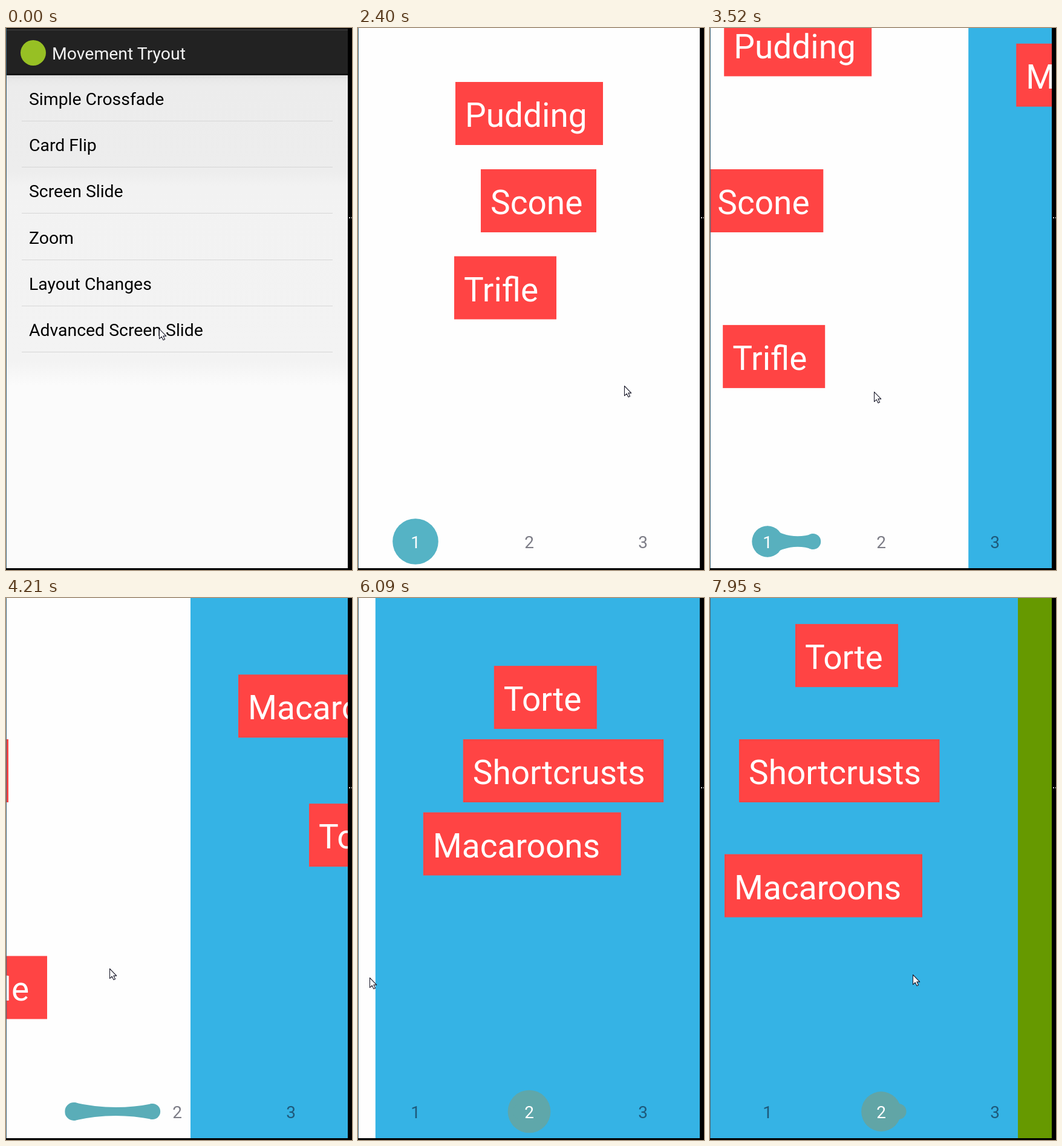
An HTML page for the animation above (8 s loop, 572 by 894 pixels).

```html
<!DOCTYPE html>
<html lang="en">
<head>
<meta charset="utf-8">
<title>Screen slide</title>
<style>
  html, body { margin: 0; width: 100%; height: 100%; overflow: hidden; background: #000; }
  svg { display: block; width: 572px; height: 894px; font-family: Roboto, "Noto Sans", sans-serif; }
  .box rect { fill: #ff4444; }
  .box text { fill: #fff; font-size: 55px; }
  .tab { font-size: 28px; text-anchor: middle; }
  .item { font-size: 28.4px; fill: #000; }
</style>
</head>
<body>
<svg viewBox="0 0 572 894">
  <defs>
    <clipPath id="screen"><rect x="1" y="0" width="564" height="891"/></clipPath>
    <linearGradient id="paper" gradientUnits="userSpaceOnUse" x1="0" y1="78" x2="0" y2="891">
      <stop offset="0" stop-color="#dedede"/>
      <stop offset=".008" stop-color="#e8e8e8"/>
      <stop offset=".022" stop-color="#ececec"/>
      <stop offset=".195" stop-color="#ededed"/>
      <stop offset=".225" stop-color="#f2f2f2"/>
      <stop offset=".58" stop-color="#f3f3f3"/>
      <stop offset=".63" stop-color="#fbfbfb"/>
      <stop offset="1" stop-color="#fbfbfb"/>
    </linearGradient>
  </defs>
  <rect width="572" height="894" fill="#000"/>
  <rect width="1" height="891" fill="#40687d"/>
  <path d="M567 312h2v2h-2zM571 312h1v2h-1z" fill="#ccc"/>
  <g clip-path="url(#screen)">
    <rect width="565" height="891" fill="#fefefe"/>
    <rect id="blue" width="564" height="891" fill="#35b3e5"/>
    <rect id="green" width="564" height="891" fill="#669900"/>
    <g id="boxes"></g>
    <g id="dot"><path/><circle/><circle/></g>
    <g id="tabs"></g>
    <g id="menu">
      <rect y="78" width="565" height="813" fill="url(#paper)"/>
      <rect width="565" height="78" fill="#222"/>
      <rect width="565" height="2" fill="#0c0c0c"/>
      <rect y="2" width="565" height="2" fill="#383838"/>
      <rect y="75" width="565" height="3" fill="#141414"/>
      <circle cx="45" cy="41" r="21" fill="#97c024"/>
      <text x="76" y="52" font-size="28.4" fill="#f3f3f3">Movement Tryout</text>
    </g>
    <path id="cursor" d="M.5 .5V16.6L4.2 13.2L7 18.8L9.6 17.6L6.9 12.1H11.8Z"
          fill="#fff" stroke="#1c1c2c" stroke-width="1.1" stroke-linejoin="round"/>
  </g>
</svg>
<script>
const LOOP = 8000, WIDTH = 564, RELEASE = 5900;
const $ = id => document.getElementById(id);

function add(parent, name, attrs, text) {
  const el = document.createElementNS('http://www.w3.org/2000/svg', name);
  set(el, attrs);
  if (text) el.textContent = text;
  return parent.appendChild(el);
}
function set(el, attrs) {
  for (const key in attrs) el.setAttribute(key, attrs[key]);
}

['Simple Crossfade', 'Card Flip', 'Screen Slide', 'Zoom', 'Layout Changes', 'Advanced Screen Slide']
  .forEach((label, i) => {
    const y = 127 + i * 76.2;
    add($('menu'), 'text', { class: 'item', x: 38, y }, label);
    add($('menu'), 'rect', { x: 26, y: Math.round(y + 26), width: 514, height: 1, fill: '#d6d6d6' });
  });

const tabs = [1, 2, 3].map((n, i) =>
  add($('tabs'), 'text', { class: 'tab', x: tabX(i), y: 858 }, String(n)));

// Row 0 and 2 drift vertically, row 1 slides faster.
const boxes = [
  [0, 0, 161, 244, 'Pudding'], [0, 1, 203, 191, 'Scone'], [0, 2, 159, 169, 'Trifle'],
  [1, 0, 197, 170, 'Torte'], [1, 1, 132, 331.5, 'Shortcrusts'], [1, 2, 80, 327, 'Macaroons']
].map(([page, row, x, width, label]) => {
  const el = add($('boxes'), 'g', { class: 'box' });
  add(el, 'rect', { width, height: 104 });
  add(el, 'text', { x: 16, y: 74 }, label);
  return { el, page, row, x };
});

// The screen refreshes unevenly: [time, refreshes since the previous entry].
const ticks = [0];
for (const [end, n] of [
  [500, 1], [1160, 5], [1430, 2], [1580, 1], [2100, 4], [2400, 1], [2920, 4], [3380, 3],
  [3520, 1], [4210, 5], [4470, 2], [4590, 1], [5310, 5], [5580, 2], [5730, 1], [6090, 3],
  [6660, 4], [6810, 1], [7810, 7], [7950, 1]
]) {
  const from = ticks[ticks.length - 1];
  for (let i = 1; i <= n; i++) ticks.push(from + (end - from) * i / n);
}

const drag = [[2400, 0], [2920, 60], [3380, 113], [4210, 260], [5310, 377], [RELEASE, 402]];
const dragOn = [[7425, 564], [7810, 605], [7950, 620]];
const pointer = [
  [0, 253, 496], [500, 253, 496], [1160, 346, 509], [1430, 380, 557], [2100, 457, 590],
  [2400, 440, 590], [2920, 358, 590], [4210, 171, 611], [5310, 44, 623], [RELEASE, 19, 626],
  [6090, 19, 626], [7000, 424, 618], [7300, 424, 619], [7950, 335, 621]
];

function tabX(i) { return 95 + 188 * i; }
const clamp = v => Math.max(0, Math.min(1, v));

function along(keys, t, col = 1) {
  let i = 1;
  while (i < keys.length - 1 && keys[i][0] < t) i++;
  const a = keys[i - 1], b = keys[i];
  return a[col] + (b[col] - a[col]) * clamp((t - a[0]) / (b[0] - a[0]));
}

function scrollAt(t) {
  if (t < RELEASE) return along(drag, t);
  if (t > 7425) return along(dragOn, t);
  return WIDTH - 162 * (1 - clamp((t - RELEASE) / 640)) ** 5;
}

function ease(u) {
  const edge = Math.atan(.5);
  return (Math.atan(clamp(u) - .5) + edge) / (2 * edge);
}

// Elastic dot: the head leaves first and the foot follows.
function drawDot(p, visible) {
  const page = Math.floor(p), f = p - page, x = tabX(page), y = 847;
  const head = x + 188 * ease(f / .6), foot = x + 188 * ease((f - .4) / .6);
  const headR = 13 + 24.8 * Math.max(0, 2 * f - 1);
  const footR = 13 + 24.8 * Math.max(0, 1 - 2 * f);
  const mid = (head + foot) / 2;
  const [link, c1, c2] = $('dot').children;
  set($('dot'), {
    fill: `rgb(${85 + 11 * p},${179 - 13 * p},${197 - 28 * p})`,
    visibility: visible ? 'visible' : 'hidden'
  });
  set(link, { d: `M${foot} ${y - footR}Q${mid} ${y} ${head} ${y - headR}V${y + headR}Q${mid} ${y} ${foot} ${y + footR}Z` });
  set(c1, { cx: head, cy: y, r: headR });
  set(c2, { cx: foot, cy: y, r: footR });
}

function draw(time) {
  const t = ticks.filter(k => k <= time + 2).pop();
  const s = scrollAt(t);
  set($('blue'), { x: 1 + WIDTH - s });
  set($('green'), { x: 1 + 2 * WIDTH - s });
  for (const { el, page, row, x } of boxes) {
    const d = page * WIDTH - s;
    const bx = x + d * (row === 1 ? 1.5 : 1);
    const by = [89 + .823 * d, 233, 376.5 - .823 * d][row];
    set(el, { transform: `translate(${bx} ${by})` });
  }
  drawDot(s / WIDTH, t >= 1700);
  const chosen = t < RELEASE ? 0 : 1;
  tabs.forEach((tab, i) => set(tab, { fill: i === chosen ? '#fff' : 'rgba(10,10,28,.53)' }));
  set($('menu'), { opacity: 1 - clamp((t - 630) / 400) });
  set($('cursor'), { transform: `translate(${along(pointer, t)} ${along(pointer, t, 2)})` });
}

const start = performance.now();
function loop() {
  draw((performance.now() - start) % LOOP);
  requestAnimationFrame(loop);
}
loop();
</script>
</body>
</html>
```
